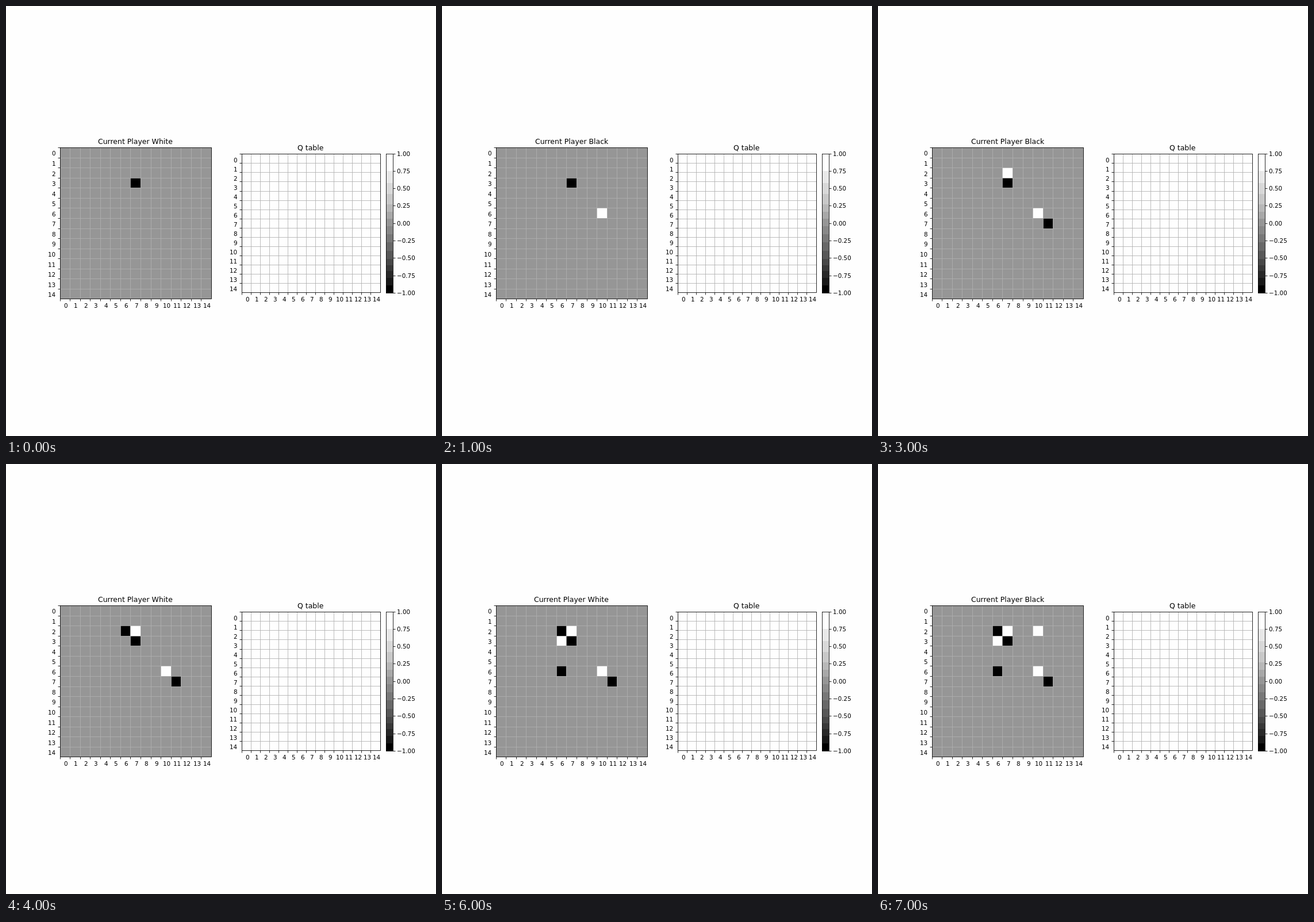
Recreate the animation shown at these times as an HTML page with a canvas. Size 748 px wide and 748 px high, loop 8 s.

```html
<!DOCTYPE html>
<html lang="en">
<head>
<meta charset="utf-8">
<title>Board and Q table</title>
<style>
  html, body { margin: 0; width: 100%; height: 100%; overflow: hidden; background: #fefefe; }
  canvas { display: block; }
</style>
</head>
<body>
<canvas id="stage" width="748" height="748"></canvas>
<script>
const ctx = document.getElementById('stage').getContext('2d');
const CELLS = 15, STEP_MS = 1000;
const PAPER = '#fefefe', INK = '#000', BOARD = '#969696', GRID = '#b0b0b0';
const LINE = 0.83, TICK = 4, LABEL_SHIFT = 10.39;
const LABEL_FONT = '10.39px "DejaVu Sans", sans-serif';
const TITLE_FONT = '12.47px "DejaVu Sans", sans-serif';

// Column and row of each move; black starts and the players alternate.
const MOVES = [[7, 3], [10, 6], [11, 7], [7, 2], [6, 2], [6, 3], [6, 6], [10, 2]];

const board = { x: 93.5, y: 245.99, size: 263.5 };
const table = { x: 409.7, y: 257.32, size: 240.84 };
const bar = { x: 661.08, y: 256.53, w: 12.12, h: 242.43 };

// Grey levels at even distances from the bottom of the scale to the top.
const RAMP = [0, 37, 82, 115, 150, 189, 217, 240, 255];

const snap = v => Math.floor(v + 0.5);

function line(x1, y1, x2, y2, color = INK) {
  ctx.strokeStyle = color;
  ctx.lineWidth = LINE;
  ctx.beginPath();
  ctx.moveTo(x1 + 0.5, y1 + 0.5);
  ctx.lineTo(x2 + 0.5, y2 + 0.5);
  ctx.stroke();
}

function frame(x, y, w, h) {
  const left = snap(x), top = snap(y);
  ctx.strokeStyle = INK;
  ctx.lineWidth = LINE;
  ctx.strokeRect(left + 0.5, top + 0.5, snap(x + w) - left, snap(y + h) - top);
}

// align: 0 = left, 0.5 = centre, 1 = right
function text(str, x, baseline, align, font = LABEL_FONT) {
  ctx.font = font;
  ctx.fillStyle = INK;
  ctx.fillText(str, Math.round(x - align * ctx.measureText(str).width), Math.round(baseline));
}

function title(plot, str) {
  text(str, plot.x + plot.size / 2, plot.y - 6.2, 0.5, TITLE_FONT);
}

function axes(plot) {
  const { x, y, size } = plot;
  const left = snap(x), top = snap(y), right = snap(x + size), bottom = snap(y + size);
  for (let i = 0; i < CELLS; i++) {
    const offset = i * size / CELLS;
    const gx = snap(x + offset), gy = snap(y + offset);
    line(gx, top, gx, bottom, GRID);
    line(left, gy, right, gy, GRID);
    line(gx, bottom, gx, bottom + TICK);
    line(left - TICK, gy, left, gy);
    text(String(i), x + offset + LABEL_SHIFT, y + size + 15.4, 0.5);
    text(String(i), x - 7.27, y + offset + LABEL_SHIFT + 4, 1);
  }
  frame(x, y, size, size);
}

function piece([col, row], color) {
  const cell = board.size / CELLS;
  const x = snap(board.x + col * cell), y = snap(board.y + row * cell);
  ctx.fillStyle = color;
  ctx.fillRect(x, y, snap(board.x + (col + 1) * cell) - x, snap(board.y + (row + 1) * cell) - y);
}

function scaleShade(u) {
  const pos = u * (RAMP.length - 1);
  const i = Math.min(Math.floor(pos), RAMP.length - 2);
  const band = Math.floor((RAMP[i] + (RAMP[i + 1] - RAMP[i]) * (pos - i)) / 16);
  if (band === 0) return INK;
  if (band === 15) return PAPER;
  if (band === 9) return BOARD;
  const grey = band * 16 + 8;
  return `rgb(${grey},${grey},${grey})`;
}

function colorBar() {
  const { x, y, w, h } = bar;
  const left = snap(x), top = snap(y), right = snap(x + w), bottom = snap(y + h);
  for (let row = top; row < bottom; row++) {
    ctx.fillStyle = scaleShade(1 - (row + 0.5 - top) / (bottom - top));
    ctx.fillRect(left, row, right - left, 1);
  }
  frame(x, y, w, h);
  for (let i = 0; i <= 8; i++) {
    const value = 1 - i / 4, ty = y + h * i / 8;
    line(right, snap(ty), right + TICK, snap(ty));
    text((value < 0 ? '\u2212' : '') + Math.abs(value).toFixed(2), x + w + 7.27, ty + 4, 0);
  }
}

function draw(ms) {
  const turn = Math.floor(ms / STEP_MS) % MOVES.length;
  ctx.fillStyle = PAPER;
  ctx.fillRect(0, 0, 748, 748);

  ctx.fillStyle = BOARD;
  ctx.fillRect(snap(board.x), snap(board.y), board.size, board.size);
  MOVES.slice(0, turn + 1).forEach((move, i) => piece(move, i % 2 ? PAPER : INK));
  axes(board);
  title(board, 'Current Player ' + (turn % 2 ? 'Black' : 'White'));

  axes(table);
  title(table, 'Q table');
  colorBar();
}

const start = performance.now();
function tick() {
  draw(performance.now() - start);
  requestAnimationFrame(tick);
}
tick();
</script>
</body>
</html>
```
